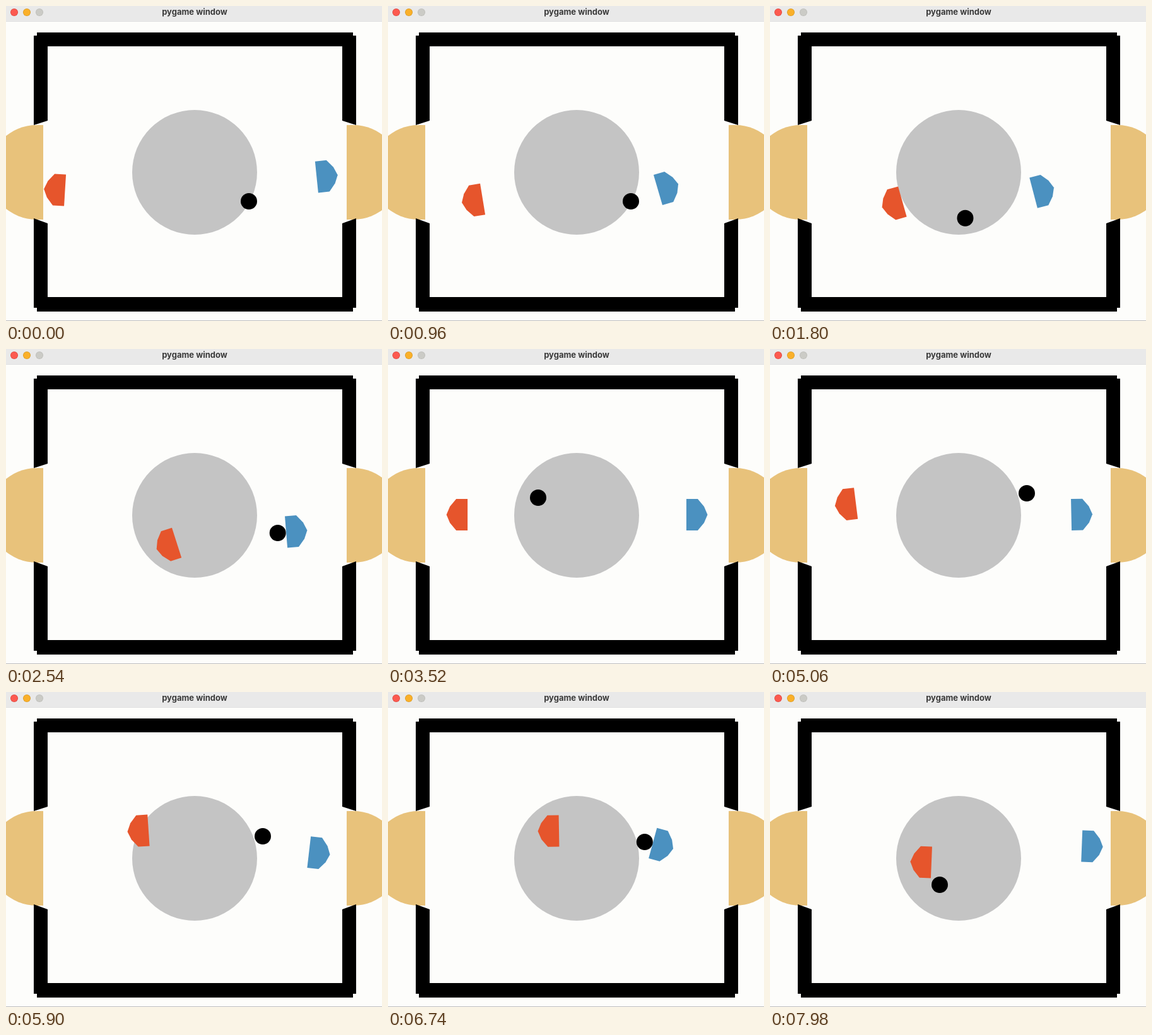
Animation, 596 px wide and 500 px high, one loop 8 s. Source, as an HTML page with a canvas:

```html
<!DOCTYPE html>
<html lang="en">
<head>
<meta charset="utf-8">
<title>pygame window</title>
<style>
html, body { margin: 0; width: 100%; height: 100%; overflow: hidden; background: #fdfdfb; }
canvas { display: block; }
</style>
</head>
<body>
<canvas id="stage" width="596" height="500"></canvas>
<script>
const ctx = document.getElementById('stage').getContext('2d');
const LOOP = 8000;
const MID_X = 299.5;

// Smooth curve through points [ms, x, y, degrees] (Lagrange interpolation).
const through = (...points) => t => {
  const sum = [0, 0, 0];
  for (const p of points) {
    let weight = 1;
    for (const q of points) if (q !== p) weight *= (t - q[0]) / (p[0] - q[0]);
    for (let i = 0; i < 3; i++) sum[i] += weight * p[i + 1];
  }
  return sum;
};

// Ball at rest, then straight runs from one hit [ms, x, y] to the next.
const roll = (...hits) => t => {
  const next = hits.findIndex(h => h[0] > t);
  if (next < 1) return hits.at(next).slice(1);
  const [t0, x0, y0] = hits[next - 1], [t1, x1, y1] = hits[next];
  const k = (t - t0) / (t1 - t0);
  return [x0 + (x1 - x0) * k, y0 + (y1 - y0) * k];
};

// Each play starts with a hard reset; robots stand still after `stop`.
const plays = [
  {
    start: 0, stop: 3000,
    red: through([0, 93.5, 292.5, 3.5], [960, 150, 306.5, -9.3], [2540, 270.5, 307.5, -17.7]),
    blue: through([0, 492.5, 271.5, -5.8], [960, 428, 292, -16.3], [2540, 444, 290.5, -4.7]),
    ball: roll([1400, 385, 310], [2000, 272, 350], [2540, 431, 292], [2900, 328, 302], [3500, 577, 232])
  },
  {
    start: 3520, stop: 4600,
    red: through([3520, 126, 263, 0], [4150, 222, 242, -7]),
    blue: through([3520, 473, 263, 0], [4600, 440, 278, 6]),
    ball: roll([4150, 238, 236], [4600, 577, 226])
  },
  {
    start: 4950, stop: LOOP,
    red: through([5060, 136, 245, -7.1], [6740, 271, 220.5, -1], [7980, 256, 270.5, 2.3]),
    blue: through([5060, 477.5, 263, -1.2], [5500, 495, 260, 2], [6740, 419.8, 240, 15.2], [7980, 494, 244.5, 2.3]),
    ball: roll([6500, 407, 229], [6740, 407, 238], [7500, 276, 284], [7980, 269, 306])
  }
];

function polygon(points, color) {
  ctx.fillStyle = color;
  ctx.beginPath();
  points.forEach(([x, y]) => ctx.lineTo(x, y));
  ctx.fill();
}

function disc(x, y, r, color) {
  ctx.fillStyle = color;
  ctx.beginPath();
  ctx.arc(x, y, r, 0, Math.PI * 2);
  ctx.fill();
}

function rect(x, y, w, h, color) {
  ctx.fillStyle = color;
  ctx.fillRect(x, y, w, h);
}

function drawTitleBar() {
  rect(0, 0, 596, 24, '#e9e9e9');
  rect(0, 24, 596, 1, '#e0e0e0');
  [['#dd463f', '#fc5a50'], ['#d99a22', '#fab02a'], ['#bcbcb8', '#cbcbc6']]
    .forEach(([rim, fill], i) => {
      disc(13 + i * 20, 10, 6, rim);
      disc(13 + i * 20, 10, 5.2, fill);
    });
  ctx.fillStyle = '#3a3a3a';
  ctx.font = '700 13px Inter, sans-serif';
  ctx.textAlign = 'center';
  ctx.fillText('pygame window', 299, 14);
}

function drawLeftHalf() {
  ctx.fillStyle = '#e8c27b';
  ctx.beginPath();
  ctx.moveTo(59, 189);
  ctx.arc(48, 264, 75, -Math.PI / 2, Math.PI / 2, true);
  ctx.lineTo(59, 339);
  ctx.fill();
  polygon([[44, 47], [66, 47], [66, 182], [44, 189]], '#000');
  polygon([[44, 337], [66, 345], [66, 479], [44, 479]], '#000');
}

function drawField() {
  disc(299, 264, 99, '#c4c4c4');
  drawLeftHalf();
  ctx.save();
  ctx.translate(2 * MID_X, 0);
  ctx.scale(-1, 1);
  drawLeftHalf();
  ctx.restore();
  rect(49, 42, 501, 22, '#000');
  rect(49, 462, 501, 23, '#000');
}

function drawRobot([x, y, deg], facing, color) {
  ctx.save();
  ctx.translate(x, y);
  ctx.rotate(deg * Math.PI / 180);
  ctx.scale(facing, 1);
  polygon([[0, -25], [-18, -25], [-28, -13], [-33.5, 0], [-28, 13], [-18, 25], [0, 25]], color);
  ctx.restore();
}

function draw(t) {
  const play = plays.findLast(p => p.start <= t);
  const robotTime = Math.min(t, play.stop);
  rect(0, 0, 596, 500, '#fdfdfb');
  drawField();
  drawRobot(play.red(robotTime), 1, '#e6552c');
  drawRobot(play.blue(robotTime), -1, '#4b91c0');
  disc(...play.ball(t), 13, '#000');
  rect(0, 499, 596, 1, '#bdbdbd');
  drawTitleBar();
}

function tick() {
  draw(performance.now() % LOOP);
  requestAnimationFrame(tick);
}
tick();
</script>
</body>
</html>
```
